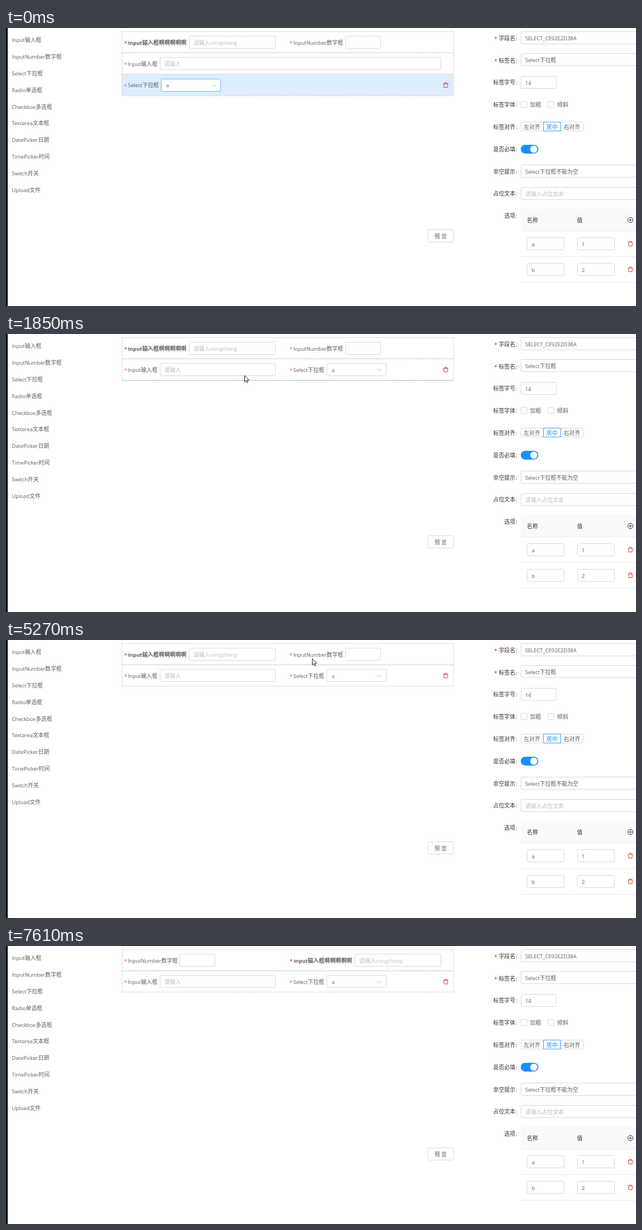
Write an HTML page with a canvas that moves like this. It is 1126 px wide and 498 px high and loops after 7.99 s.

```html
<!DOCTYPE html>
<html lang="zh-CN">
<head>
<meta charset="utf-8">
<title>Form designer</title>
<style>
html, body { margin: 0; width: 100%; height: 100%; overflow: hidden; background: #fff; }
canvas { display: block; width: 1126px; height: 498px; }
</style>
</head>
<body>
<canvas id="stage" width="1126" height="498"></canvas>
<script>
const W = 1126, H = 498, LOOP = 7990;
const stage = document.getElementById('stage').getContext('2d');
const layer = Object.assign(document.createElement('canvas'), { width: W, height: H }).getContext('2d');
let g = stage;

const TEXT = '#5c5c5c', DARK = '#303030', HINT = '#bdbdbd', LINE = '#d9d9d9';
const BLUE = '#1890ff', RED = '#e0343c', BRICK = '#cf4a3c', SELECTED = '#dcedfe';
const OUTER = '#c8c8c8', INNER = '#b2b2b2';
const COL1 = 211, COL2 = 506.5;

// Latin and CJK runs use separate fonts and sizes.
function text(str, x, cy, color = TEXT, { bold = false, align = 0 } = {}) {
  const runs = str.match(/[\u3000-\uffef]+|[^\u3000-\uffef]+/g).map(s => {
    const cjk = s.charCodeAt(0) >= 0x3000;
    const font = (bold ? '700 ' : '400 ') +
      (cjk ? '9.9px "Noto Sans CJK SC", "Noto Sans CJK", sans-serif' : '9.4px "Open Sans", sans-serif');
    g.font = font;
    return { s, font, width: g.measureText(s).width };
  });
  x -= align * runs.reduce((sum, r) => sum + r.width, 0);
  g.fillStyle = color;
  for (const r of runs) {
    g.font = r.font;
    g.fillText(r.s, x, cy + 3.7);
    x += r.width;
  }
}

function box(x, y, w, h, stroke = LINE, radius = 2, fill = '#fff') {
  g.beginPath();
  g.roundRect(x + .5, y + .5, w, h, radius);
  g.fillStyle = fill;
  g.fill();
  g.strokeStyle = stroke;
  g.lineWidth = 1;
  g.stroke();
}

function strokePath(points, color, width = 1) {
  g.beginPath();
  points.forEach(([x, y]) => g.lineTo(x, y));
  g.strokeStyle = color;
  g.lineWidth = width;
  g.stroke();
}

function dashed(x1, y1, x2, y2, color) {
  g.setLineDash([2.1, 1.4]);
  strokePath([[x1, y1], [x2, y2]], color);
  g.setLineDash([]);
}

function star(x, cy, color = '#ee6a6a') {
  g.font = '400 10px "Open Sans", sans-serif';
  g.fillStyle = color;
  g.fillText('*', x, cy + 5);
}

function trash(x, y, color) {
  strokePath([[x - 4.5, y - 2.5], [x + 4.5, y - 2.5]], color);
  strokePath([[x - 2, y - 2.5], [x - 2, y - 4.3], [x + 2, y - 4.3], [x + 2, y - 2.5]], color);
  strokePath([[x - 3.4, y - 2], [x - 3.1, y + 4], [x + 3.1, y + 4], [x + 3.4, y - 2]], color);
}

function label(str, x, cy, bold = false) {
  star(x, cy, bold ? RED : undefined);
  text(str, x + 7, cy, TEXT, { bold });
}

function boldInput(x, cy) {
  label('Input输入框啊啊啊啊啊', x, cy, true);
  box(x + 116, cy - 12, 154, 22);
  text('请输入mingcheng', x + 124, cy, HINT);
}

function numberInput(x, cy) {
  label('InputNumber数字框', x, cy);
  box(Math.floor(x + 99.5), cy - 12, 63, 22);
}

function plainInput(x, cy, width) {
  label('Input输入框', x, cy);
  box(x + 64, cy - 12, width, 22);
  text('请输入', x + 72, cy, HINT);
}

function select(x, cy, border = LINE) {
  label('Select下拉框', x, cy);
  const left = Math.floor(x + 66.5), top = Math.round(cy) - 12;
  box(left, top, 106, 22, border);
  text('a', left + 9, cy);
  strokePath([[left + 91, cy - 1.5], [left + 94.5, cy + 2.5], [left + 98, cy - 1.5]], '#b5b5b5');
}

function selectRow(border) {
  g.fillStyle = SELECTED;
  g.fillRect(207, 83, 592, 38);
  select(COL1, 102.5, border);
  trash(786, 102.5, RED);
}

function palette() {
  g.fillStyle = '#000';
  g.fillRect(0, 0, 3, H);
  ['Input输入框', 'InputNumber数字框', 'Select下拉框', 'Radio单选框', 'Checkbox多选框',
    'Textarea文本框', 'DatePicker日期', 'TimePicker时间', 'Switch开关', 'Upload文件']
    .forEach((name, i) => text(name, 10.5, 21.5 + i * 29.83));
}

function form(t) {
  const merged = t >= 1850, swapped = t >= 6830;
  const bottom = merged ? 83 : 121;
  if (!merged) selectRow(t < 1150 ? '#6bb8f7' : '#dde3e9');
  boldInput(swapped ? COL2 + .5 : COL1, 26);
  numberInput(swapped ? COL1 : COL2, 26);
  plainInput(COL1, 64, merged ? 206 : 502);
  if (merged) {
    select(COL2, 64);
    trash(786, 64, RED);
  }
  dashed(207, 6.5, 800, 6.5, OUTER);
  dashed(207, 44.5, 800, 44.5, INNER);
  dashed(207, 82.5, 800, 82.5, OUTER);
  if (!merged) dashed(207, 121.5, 800, 121.5, OUTER);
  else if (t < 1930) dashed(207, 83.5, 800, 83.5, INNER);
  for (const x of [207.5, 799.5]) dashed(x, 6.5, x, bottom, OUTER);
  box(754, 361, 45, 22);
  text('预 览', 776.8, 373, TEXT, { align: .5 });
}

function properties() {
  ['字段名', '标签名', '标签字号', '标签字体', '标签对齐', '是否必填', '非空提示', '占位文本', '选项']
    .forEach((name, i) => {
      const cy = 18 + i * 39.8;
      text(name, 910.3, cy, DARK, { align: 1 });
      text(':', 911.3, cy, DARK);
    });
  star(872.5, 18, RED);
  star(872.5, 57.5, RED);

  [[18, 'SELECT_CE92E2D38A'], [57.5, 'Select下拉框'], [257, 'Select下拉框不能为空'], [297, '请输入占位文本', HINT]]
    .forEach(([cy, value, color]) => {
      box(920, Math.floor(cy) - 12, 230, 22);
      text(value, 928, cy, color);
    });
  box(920, 86, 63, 22);
  text('14', 928, 98);

  box(920, 131, 11, 11, LINE, 1);
  text('加粗', 936.5, 137.5);
  box(968, 131, 11, 11, LINE, 1);
  text('倾斜', 985, 137.5);

  box(920, 168, 111, 16);
  box(960, 168, 31, 16, '#3a9dff', 0);
  text('左对齐', 940, 177, TEXT, { align: .5 });
  text('居中', 976, 177, BLUE, { align: .5 });
  text('右对齐', 1011.5, 177, TEXT, { align: .5 });

  g.fillStyle = BLUE;
  g.beginPath();
  g.roundRect(920, 209.3, 31.5, 15.6, 7.8);
  g.fill();
  g.fillStyle = '#fff';
  g.beginPath();
  g.arc(943.3, 217.1, 6.4, 0, 7);
  g.fill();

  g.fillStyle = '#fafafa';
  g.fillRect(920, 324, 206, 39);
  text('名称', 931, 344, DARK);
  text('值', 1020.5, 344, DARK);
  g.strokeStyle = DARK;
  g.beginPath();
  g.arc(1116, 344, 4.6, 0, 7);
  g.stroke();
  strokePath([[1113.5, 344], [1118.5, 344]], DARK);
  strokePath([[1116, 341.5], [1116, 346.5]], DARK);
  for (const y of [363.5, 409.5, 455.5]) strokePath([[920, y], [W, y]], '#ebebeb');
  [['a', '1', 387], ['b', '2', 433]].forEach(([name, value, cy]) => {
    box(931, cy - 12, 66, 22);
    text(name, 939.5, cy);
    box(1021, cy - 12, 66, 22);
    text(value, 1029, cy);
    trash(1116, cy - .5, BRICK);
  });
}

// Pointer travel: start, end, number of steps, way points.
const travel = [
  [70, 750, 10, [[1037, 428], [970, 390], [690, 255], [390, 145], [265, 111], [240, 106]]],
  [1150, 1530, 6, [[262, 104], [310, 96], [359, 89], [395, 82], [415, 78], [424, 76]]],
  [1850, 2310, 7, [[426, 74], [442, 108], [464, 146], [471, 153]]],
  [4020, 4800, 11, [[470, 150], [435, 112], [345, 60], [275, 35], [280, 31], [321, 27]]],
  [4880, 5270, 6, [[345, 24], [395, 23], [450, 24], [500, 27], [535, 31], [547, 33]]],
  [5650, 6130, 7, [[525, 33], [380, 33], [270, 30], [270, 31]]],
  [6430, 6990, 8, [[300, 31], [370, 30], [450, 29], [520, 30], [556, 33], [562, 36], [600, 80], [645, 130]]],
  [7150, 7610, 7, [[665, 142], [845, 272], [1040, 428], [1130, 500]]],
];

function pointer(t) {
  const move = travel.filter(m => t >= m[0]).pop();
  if (!move || t >= 7610) return null;
  const [start, end, steps, points] = move;
  const step = Math.min(steps - 1, Math.floor((t - start + 6) / (end - start) * (steps - 1)));
  const u = step / (steps - 1) * (points.length - 1);
  const i = Math.min(points.length - 2, Math.floor(u + 1e-9));
  return points[i].map((v, k) => v + (points[i + 1][k] - v) * (u - i));
}

const drags = [
  { press: 980, lift: 1150, drop: 1850, grip: [240, 106], draw: () => selectRow('#d5dfe8') },
  { press: 6050, lift: 6130, drop: 6830, grip: [267, 30], draw: () => boldInput(COL1, 26) },
];

// The dragged copy fades out with distance from the pointer.
function ghost(drag, [x, y]) {
  const [gx, gy] = drag.grip;
  g = layer;
  g.clearRect(0, 0, W, H);
  drag.draw();
  const fade = g.createRadialGradient(gx, gy, 0, gx, gy, 260);
  fade.addColorStop(0, 'rgba(0,0,0,.46)');
  fade.addColorStop(.5, 'rgba(0,0,0,.28)');
  fade.addColorStop(1, 'rgba(0,0,0,0)');
  g.globalCompositeOperation = 'destination-in';
  g.fillStyle = fade;
  g.fillRect(0, 0, W, H);
  g.globalCompositeOperation = 'source-over';
  g = stage;
  g.drawImage(layer.canvas, Math.round(x - gx), Math.round(y - gy));
}

function arrow(x, y) {
  g.beginPath();
  [[0, 0], [0, 11.3], [2.6, 8.9], [4.3, 13], [6.1, 12.2], [4.4, 8.3], [8, 8.2]]
    .forEach(([dx, dy]) => g.lineTo(x + dx, y + dy));
  g.closePath();
  g.fillStyle = '#fff';
  g.fill();
  g.strokeStyle = '#222';
  g.lineWidth = 1;
  g.stroke();
}

function textCursor(x, y) {
  strokePath([[x, y - 7], [x, y + 7]], '#333');
  for (const dy of [-7, 7]) strokePath([[x - 2.5, y + dy], [x + 2.5, y + dy]], '#333');
}

function drawPointer(t) {
  const at = pointer(t);
  if (!at) return;
  const [x, y] = at;
  const drag = drags.find(d => t >= d.press && t < d.drop);
  const lifted = drag && t >= drag.lift;
  if (lifted) ghost(drag, at);
  if (drag) {
    g.fillStyle = 'rgba(248,238,50,.75)';
    g.beginPath();
    g.arc(x - .5, y + 1, 8.3, 0, 7);
    g.fill();
  }
  const overInput = t < 6050 && t > 3000 &&
    ((x > 327 && x < 482 && y > 14 && y < 37) || (x > 275 && x < 482 && y > 52 && y < 75));
  if (overInput && !drag) return textCursor(x, y);
  if (lifted) box(Math.round(x) + 2, Math.round(y) + 10, 7, 5, '#444', 0);
  arrow(x + .5, y + .5);
}

function frame(now) {
  const t = now % LOOP;
  g.fillStyle = '#fff';
  g.fillRect(0, 0, W, H);
  palette();
  form(t);
  properties();
  drawPointer(t);
}

const begin = performance.now();
function tick() {
  frame(performance.now() - begin);
  requestAnimationFrame(tick);
}
tick();
</script>
</body>
</html>
```
